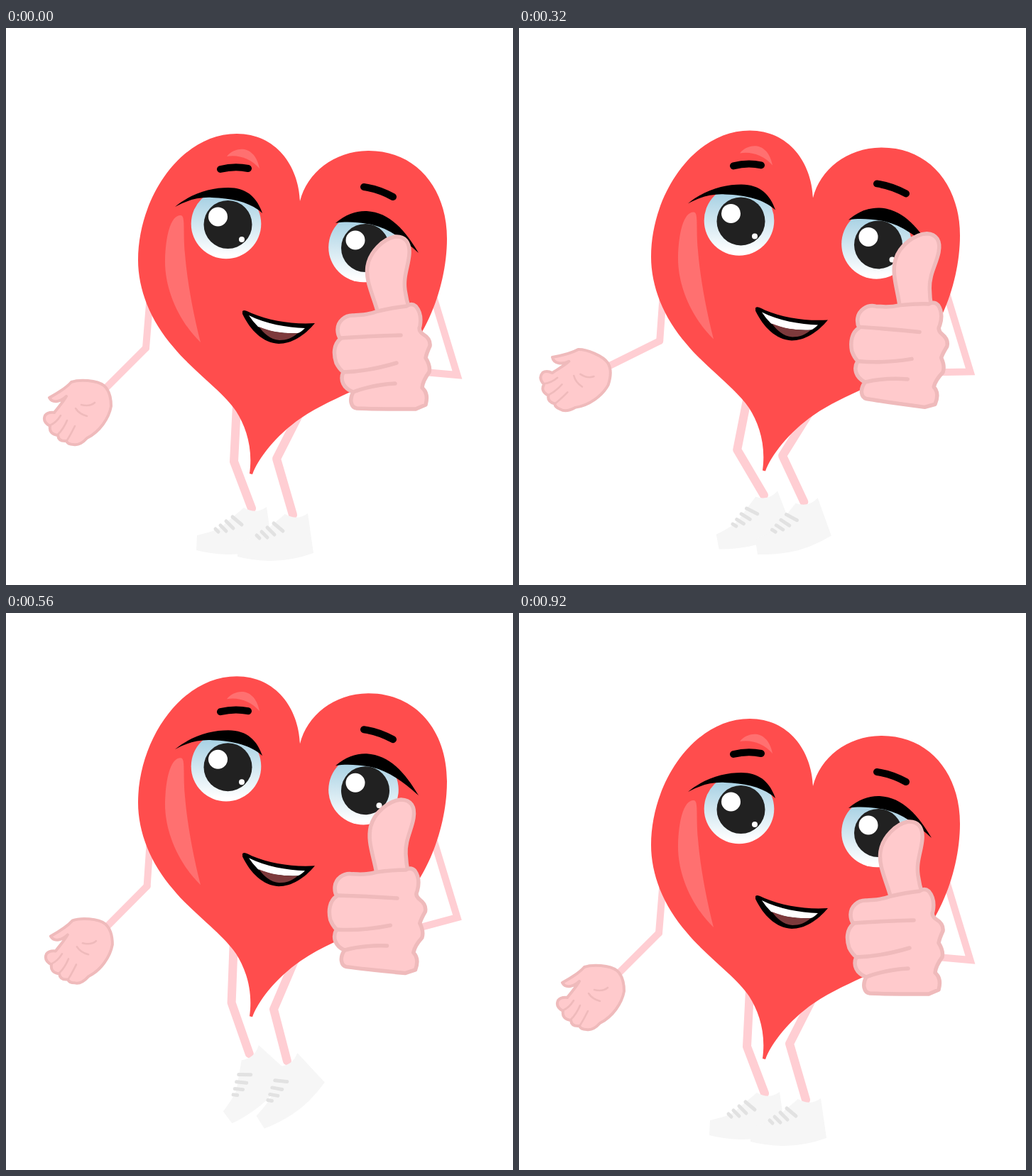
An HTML page that plays this animation: 714x785 px, repeating every 1.2 s.

```html
<!DOCTYPE html>
<html lang="en">
<head>
<meta charset="utf-8">
<title>Jumping heart</title>
<style>
html, body { margin: 0; height: 100%; overflow: hidden; background: #fff; }
svg { display: block; width: 100%; height: 100%; }
.limb { fill: none; stroke: #ffced3; stroke-width: 10; stroke-linecap: round; stroke-linejoin: round; }
.leg { stroke-width: 12; }
.skin { fill: #ffcacc; stroke: #efbabb; stroke-linecap: round; stroke-linejoin: round; }
.line { fill: none; }
</style>
</head>
<body>
<svg viewBox="0 0 714 785">
  <defs>
    <linearGradient id="iris" x2="0" y2="1">
      <stop offset="0.1" stop-color="#a6d0e3"/>
      <stop offset="0.95" stop-color="#fff"/>
    </linearGradient>
    <!-- shoe, with the ankle at 0,0 -->
    <g id="shoe">
      <path fill="#f6f6f6" d="M-81 55L-80 34C-64 30 -49 27 -40 17L-14 -5Q3 5 18 -6L26 50Q-8 62 -38 61Q-62 60 -81 55Z"/>
      <path stroke="#e2e2e2" stroke-width="5" stroke-linecap="round" d="M-30 8l13 11M-39 14l10 10M-47 20l8 8M-54 25l4 4"/>
    </g>
    <g id="eye">
      <circle r="49.3" fill="url(#iris)"/>
      <circle cx="2.5" cy="1" r="34" fill="#212121"/>
      <circle cx="-11.5" cy="-10" r="13.5" fill="#fff"/>
      <circle cx="22" cy="22" r="4" fill="#fff"/>
    </g>
  </defs>

  <path id="legL" class="limb leg"/>
  <path id="legR" class="limb leg"/>
  <use id="shoeL" href="#shoe"/>
  <use id="shoeR" href="#shoe"/>

  <g id="body">
    <path id="armL" class="limb"/>
    <!-- forearm and open hand, with the elbow at 0,0 -->
    <g id="wave">
      <path class="limb" d="M0 0L-62 62"/>
      <g class="skin" stroke-width="4" transform="translate(-197 -451)">
        <path d="M61 521C72 515 84 508 92 499C103 495 128 496 138 504C146 511 148 522 148 533C145 550 132 569 114 578Q104 589 95 587Q87 587 85 582Q74 583 73 574Q60 572 62 561Q51 555 55 546Q59 541 68 542C73 535 80 528 85 519C78 526 66 530 61 521Z"/>
        <path class="line" stroke-width="2.6" d="M62 560Q71 556 77 546M73 573Q81 565 86 553M86 581Q91 573 97 561M106 531Q118 534 125 528M98 536Q103 544 114 547"/>
      </g>
    </g>
    <path id="armR" class="limb" style="stroke-linejoin:miter"/>

    <path fill="#ff4d4d" d="M414 244C412 194 380 149 325 149C246 149 186 240 186 327C186 368 203 412 236 450C262 482 304 511 324 540C338 562 348 592 343 628L347 629C355 607 380 574 415 550C450 526 488 514 528 491C585 458 621 370 621 297C621 225 577 173 511 173C462 173 424 204 414 244Z"/>
    <g fill="#ff7070">
      <path d="M274 443C245 415 223 370 224 326C225 295 231 264 246 264C253 264 249 285 252 318C255 355 263 400 274 443Z"/>
      <path d="M311 181C322 167 350 163 357 198C345 184 327 178 311 181Z"/>
    </g>

    <use href="#eye" x="310" y="276"/>
    <use href="#eye" x="503.5" y="309"/>
    <path d="M238 252C262 232 290 225 313 225C340 225 354 240 361 261C345 246 320 240 290 239C270 238 255 243 238 252Z"/>
    <path d="M464 275C478 263 492 258 506 258C540 259 562 285 581 317C560 298 540 283 515 277C498 274 480 272 464 275Z"/>
    <path fill="none" stroke="#000" stroke-width="10" stroke-linecap="round" d="M302 199Q322 194 341 198M504 224Q525 227 545 238"/>

    <path d="M333 399C336 396 341 400 346 402C372 413 405 418 435 416C420 434 402 445 384 445C362 444 344 426 333 403Z"/>
    <path fill="#fff" d="M342 405C366 417 395 422 421 423Q415 429 411 430C395 431 372 429 355 421Q347 413 342 405Z"/>
    <path fill="#7d3a3c" d="M356 421C375 429 395 431 411 430C403 437 395 440 385 440C372 439 363 430 356 421Z"/>

    <g id="thumb" class="skin" stroke-width="5.5">
      <path d="M524 402C517 376 506 357 509 336C512 316 531 297 548 294C562 293 569 302 568 318C567 335 559 350 562 370Q564 384 568 396Z"/>
      <path d="M524 399C508 405 502 404 490 405C477 404 467 414 467 425Q467 433 471 438C461 446 461 460 465 472Q469 480 475 485C470 496 475 508 489 513C483 524 486 535 494 536C520 537 552 537 577 537L591 531C594 520 592 512 586 507Q587 497 596 485Q598 476 591 465Q592 459 597 448Q598 438 588 432Q580 427 583 420C585 409 583 399 577 392Q571 387 564 392Q545 394 524 399Z"/>
      <path class="line" d="M471 437Q515 434 556 433M475 485Q510 484 550 472M489 513Q515 503 548 501"/>
    </g>
  </g>
</svg>
<script>
const $ = id => document.getElementById(id);
const ramp = (t, from, to) => Math.min(1, Math.max(0, (t - from) / (to - from)));
const place = (id, x, y, turn = 0) =>
  $(id).setAttribute("transform", `translate(${x} ${y}) rotate(${turn})`);
const line = (id, ...points) => $(id).setAttribute("d", "M" + points.join("L"));

function draw(now) {
  const t = Math.floor(now % 1200 / 40) * 40;
  const jump = ramp(t, 280, 480) - ramp(t, 480, 680);
  const crouch = ramp(t, 0, 280) - ramp(t, 680, 920) - jump;
  // a standing value, plus what a full crouch and a full jump add to it
  const move = (stand, down, up) => stand + down * crouch + up * jump;

  const lift = move(0, 23, -115);
  place("body", 0, lift);

  const elbow = [move(197, 1, 2), move(451, -5, -7)];
  line("armL", [204, 365], elbow);
  place("wave", ...elbow, move(0, 28, -19));

  const bend = move(185, 1, -34) * Math.PI / 180;
  line("armR", [600, 372], [635.5, 489],
    [635.5 + 75 * Math.cos(bend), 489 + 75 * Math.sin(bend)]);
  $("thumb").setAttribute("transform",
    `translate(${move(0, 17.5, -17)} ${move(0, -18, 56)}) rotate(${move(0, 8.5, 3.5)} 529.5 415.5)`);

  function leg(side, hipX, hipY, knee, ankle, turn) {
    const [x, y] = ankle;
    line("leg" + side, [move(hipX, 0, -8), hipY + lift], knee, [x - 3, y - 4]);
    place("shoe" + side, x, y, turn);
  }
  leg("L", 326, 512, [move(321, -19, 7), move(611, 6, -107)],
    [move(349, 0, -5.4), move(681, 0, -93)], -66 * jump);
  leg("R", 416, 538, [move(381, -13, 2), move(607, 18, -93)],
    [move(407, 0, -13.5), move(690, 0, -91.4)], -58 * jump);
}

const start = performance.now();
function loop() {
  draw(performance.now() - start);
  requestAnimationFrame(loop);
}
loop();
</script>
</body>
</html>
```
